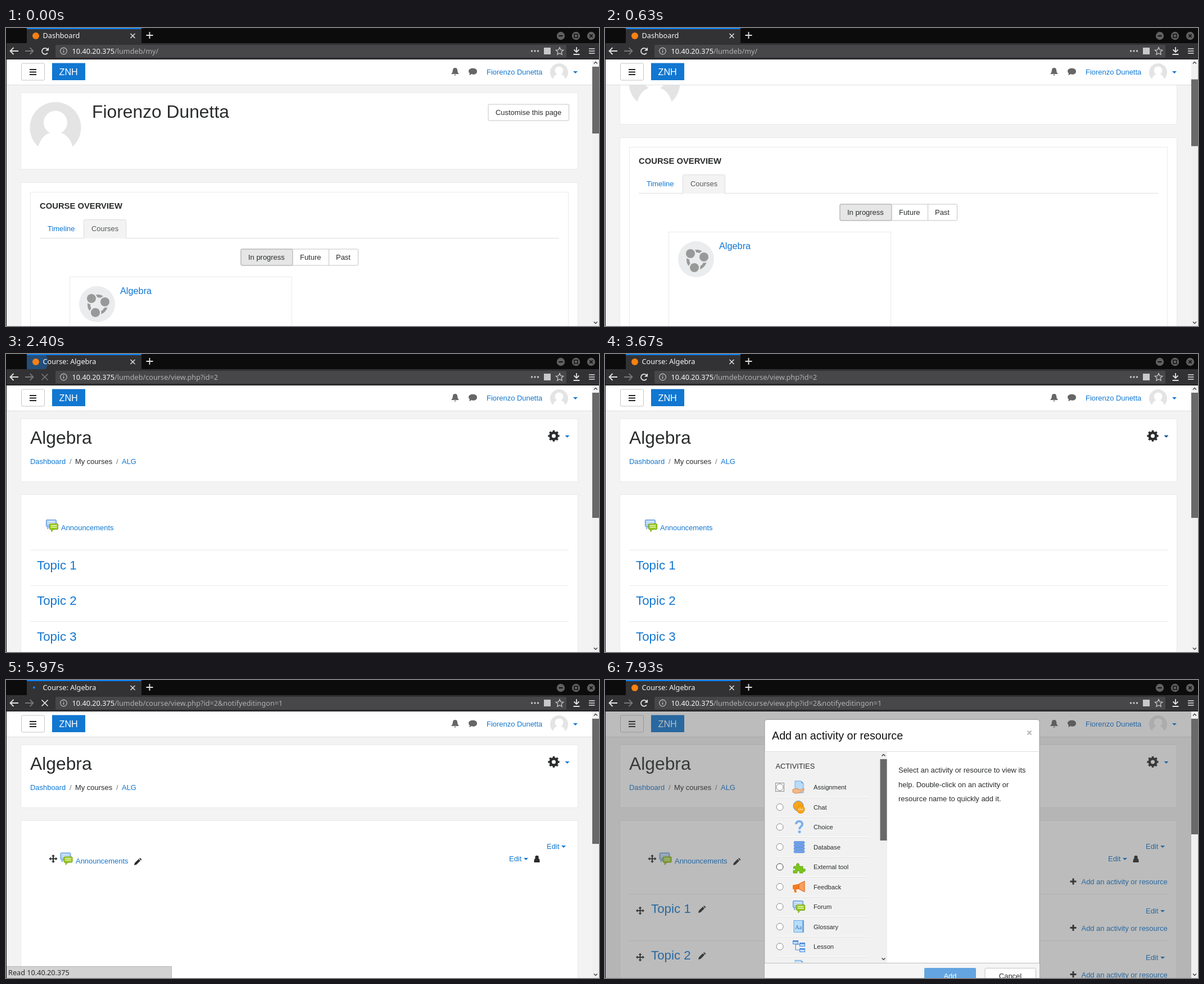
An HTML page that plays this animation: 1055 px wide and 531 px high, repeating every 8000 ms.

```html
<!DOCTYPE html>
<html lang="en">
<head>
<meta charset="utf-8">
<title>Course editing</title>
<style>
html, body { margin: 0; width: 100%; height: 100%; overflow: hidden; background: #f3f3f3; }
svg { display: block; font-family: "Liberation Sans", Arial, sans-serif; }
.ui { font-family: "Noto Sans", sans-serif; font-size: 12.7px; }
</style>
</head>
<body>
<svg id="stage" width="1055" height="531" viewBox="0 0 1055 531"></svg>
<script>
const INK = '#292b2c', LINK = '#1177d1', DARK = '#0b4f8a', LINE = '#eaeaea';
const HOST = '10.40.20.375', ROOT = '/lumdeb/', USER = 'Fiorenzo Dunetta';

// Markup helpers
const text = (x, y, s, fill = INK, size = 12.95, more = '') =>
  `<text x="${x}" y="${y}" fill="${fill}" font-size="${size}" ${more}>${s}</text>`;
const ui = (x, y, s, fill, more = '') => `<text class="ui" x="${x}" y="${y}" fill="${fill}" ${more}>${s}</text>`;
const box = (x, y, w, h, fill, more = '') =>
  `<rect x="${x}" y="${y}" width="${w}" height="${h}" fill="${fill}" ${more}/>`;
const frame = (x, y, w, h, stroke = LINE, fill = '#fff', r = 0) =>
  box(x + .5, y + .5, w - 1, h - 1, fill, `stroke="${stroke}" rx="${r}"`);
const dot = (x, y, r, fill, more = '') => `<circle cx="${x}" cy="${y}" r="${r}" fill="${fill}" ${more}/>`;
const fill = (d, c, more = '') => `<path d="${d}" fill="${c}" ${more}/>`;
const line = (d, c, w = 1, more = '') => `<path d="${d}" fill="none" stroke="${c}" stroke-width="${w}" ${more}/>`;
const rule = (x1, x2, y, c = LINE) => line(`M${x1} ${y + .5}H${x2}`, c);
const at = (x, y, s, more = '') => `<g transform="translate(${x} ${y}) ${more}">${s}</g>`;
const group = (id, s, more = '') => `<g id="${id}" ${more}>${s}</g>`;
const repeat = (n, f) => Array.from({ length: n }, (_, i) => f(i)).join('');

// Icons, centred on x, y
const caret = (x, y, c = LINK, more = '') => fill(`M${x - 4} ${y - 2}h8l-4 4z`, c, more);
const gear = (x, y, r) =>
  dot(x, y, r * .58, 'none', `stroke="${INK}" stroke-width="${r * .46}"`) +
  dot(x, y, r * .86, 'none', `stroke="${INK}" stroke-width="${r * .3}" pathLength="16" stroke-dasharray="1" stroke-dashoffset=".5"`);
const pencil = (x, y) => at(x, y, fill('M-6 6l1-4L2-5l3 3-7 7zM3-6l1.5-1 3 3L6-2.500z', INK));
const move = (x, y) => at(x, y, line('M-5 0H5M0-5V5', INK, 2) +
  repeat(4, i => fill('M-3-4.300L0-7.500 3-4.300z', INK, `transform="rotate(${i * 90})"`)));
const plus = (x, y) => line(`M${x - 5.5} ${y}h11M${x} ${y - 5.5}v11`, INK, 3);
const person = (x, y) => dot(x, y - 3, 3.2, INK) + fill(`M${x - 5} ${y + 6}v-3q0-4 3-4h4q3 0 3 4v3z`, INK);
const avatar = (x, y, k) => at(x, y, dot(0, 0, 45.5, '#e4e4e4') + dot(0, -9, 21, '#fff') +
  fill('M-32 40C-28 18-16 8 0 8S28 18 32 40V46H-32z', '#fff'), `scale(${k})`);
const bubble = (x, y, w, h, c, edge, tail) => frame(x, y, w, h, edge, c, 1.5) +
  fill(`M${x + tail} ${y + h - 1}h5l-4 5z`, c, `stroke="${edge}" stroke-width=".7"`) +
  rule(x + 3, x + w - 3, y + 3, '#fff') + rule(x + 3, x + w - 3, y + 6, '#fff');
const forum = (x, y) => at(x, y, bubble(-11, -11, 19, 13, '#a9cdf5', '#5b93d6', 2) +
  bubble(-5, -4, 16, 11, '#a4d12a', '#6a9a10', 3));
const page = fill('M-7-11H4l4 4V10H-7z', '#b9dcfa', 'stroke="#6aa6de"') + fill('M4-11v4h4z', '#6aa6de');
const chevron = (x, y, up) => line(`M${x - 3} ${y + up * 1.5}l3 ${-up * 3}l3 ${up * 3}`, '#444', 1.5);
const scrollBar = (x, y, h, id, thumbY, thumbH) => box(x, y, 12, h, '#f0f0f0') +
  chevron(x + 6, y + 6, 1) + chevron(x + 6, y + h - 6, -1) + box(x, thumbY, 12, thumbH, '#696969', `id="${id}"`);

// Pages
const dashboard = () => frame(26, 115, 992, 137) + avatar(88, 177.5, 1) + text(153, 160, USER, INK, 31.8) +
  frame(857.5, 135.5, 144.5, 30, '#c4c4c4', '#fff', 2) + text(871, 155, 'Customise this page') +
  frame(26, 275, 992, 600) + frame(43, 292, 958, 600) +
  text(60, 322, 'COURSE OVERVIEW', INK, 14.8, 'font-weight="bold"') +
  text(74, 362, 'Timeline', LINK) + rule(60, 984, 374, '#ddd') +
  line('M138.500 374V343.500q0-2 2-2H211.500q2 0 2 2V374', '#ddd', 1, 'style="fill:#f3f3f3"') +
  box(139, 374, 74, 1, '#f3f3f3') + text(152, 362, 'Courses', '#55595c') +
  frame(417.5, 393.5, 209.5, 30, '#c4c4c4', '#fff', 2) + frame(417.5, 393.5, 93, 30, '#a8a8a8', '#e6e6e6', 2) +
  line('M574.500 394v29', '#c4c4c4') +
  text(431, 413, 'In progress') + text(523, 413, 'Future') + text(587, 413, 'Past') +
  frame(113, 443, 396, 500) + dot(162, 492, 32, '#ebeced') +
  dot(163, 493, 15.5, 'none', 'stroke="#999" stroke-width="5"') +
  [[152, 482, 8], [176, 488, 8], [159, 507, 8]].map(([x, y, r]) =>
    dot(x, y, r + 2.5, '#ebeced') + dot(x, y, r, '#999')).join('') +
  text(203, 474, 'Algebra', LINK, 16.3, 'id="courseLink"') +
  group('courseLine', rule(203, 259, 476, DARK));

const courseHead = () => frame(26, 115, 992, 113) + text(43, 160, 'Algebra', INK, 31.8) +
  text(43, 196, 'Dashboard', LINK) + text(113, 196, '/', '#777') + text(123, 196, 'My courses') +
  text(196, 196, '/', '#777') + text(206, 196, 'ALG', LINK) +
  gear(974.5, 146, 10) + caret(998.5, 147, LINK, 'id="gearCaret"') + frame(26, 250, 992, 400);

const topics = () => forum(82, 306) + text(98, 314, 'Announcements', LINK) +
  repeat(3, i => rule(43, 1001, 349 + 63.7 * i | 0) + text(55, 383.5 + 63.7 * i, 'Topic ' + (i + 1), LINK, 22.3));

const menuIcons = [
  (x, y) => gear(x, y, 6.5), pencil, (x, y) => gear(x, y, 6.5),
  (x, y) => fill(`M${x - 6} ${y - 5}h12l-4.500 5v6l-3-2.500v-3.500z`, INK),
  (x, y) => gear(x, y, 6.5),
  (x, y) => at(x, y, line('M-5.500-6.500H2l3.500 3.500V6.500H-5.500zM2-6v3.500h3.500', INK, 1.3) + line('M-1.500-5V1', INK, 2, 'stroke-dasharray="1.2"') + dot(-1, 3, 1.8, INK)),
  ...Array(2).fill((x, y) => at(x, y, line('M-4 5H1V-3', INK, 2) + fill('M-3-2L1-6.500 5-2z', INK))),
  (x, y) => at(x, y, line('M6 0H-4M0-5L-5 0 0 5', INK, 2.5)),
  (x, y) => gear(x, y, 6.5)
];
const menu = () => frame(838.5, 163, 167.5, 355, '#d2d2d2') +
  group('menuRow', box(839.5, 203, 165.5, 34, '#f3f3f3')) +
  ['Edit settings', 'Turn editing on', 'Course completion', 'Filters', 'Gradebook setup', 'Backup', 'Restore', 'Import', 'Reset', 'More...']
    .map((s, i) => menuIcons[i](865, 185.5 + 34.55 * i) + text(878.5, 189 + 34.55 * i, s) +
      (i ? rule(839, 1005, Math.round(167.5 + 34.55 * i), '#ddd') : '')).join('') +
  group('settingsLine', rule(879, 949, 190, INK)) + group('editingLine', rule(879, 965, 225, INK));

const editLink = (x, y) => text(x, y, 'Edit', LINK) + caret(x + 30, y - 4);
const addLink = y => plus(833, y - 5) + text(847.5, y, 'Add an activity or resource', LINK);
const editing = () => move(84, 318.5) + forum(107.5, 318.5) + text(124, 327, 'Announcements', LINK) +
  pencil(234, 324) + editLink(962, 301) + editLink(895, 323) + person(944.5, 319) +
  group('sections', addLink(364) + repeat(2, i => at(0, 83 * i, rule(43, 1001, 381) + move(62.5, 411) +
    text(82, 415, 'Topic ' + (i + 1), LINK, 22.3) + pencil(172, 409) + editLink(962, 416) + addLink(446.5))) +
    group('addLine', rule(848, 1001, 365, DARK)));

const nav = () => box(1, 56, 1042, 45, '#fff') + rule(1, 1043, 101, '#dedede') +
  frame(27, 62.5, 42, 31, '#c4c4c4', '#fff', 2) + line('M42 74h12M42 78.500h12M42 83h12', '#222', 2) +
  box(82, 62.5, 59, 30.5, LINK) + text(94.5, 84, 'ZNH', '#fff', 16.2) +
  fill('M792 82q3-3 3-7 0-4 4-4 4 0 4 4 0 4 3 7zM797 83h4q-2 3-4 0z', '#666') +
  fill('M823 77c0-7 15-7 15 0s-8 6-10 5q-2 2-4 2 1-2 1-3-2-2-2-4z', '#666') +
  text(855, 83, USER, LINK) + avatar(984, 79, .352) + caret(1013, 79);

const activities = [
  ['Assignment', page + fill('M-11 4l8-2 5 3 6-3 2 2-8 6-8 1-5-2z', '#f3b98a', 'stroke="#d98c50"')],
  ['Chat', dot(-1, -2, 9, '#f9a61a', 'stroke="#5b93e0"') + dot(3, 4, 7, '#f9a61a', 'stroke="#e58a00"') +
    [0, 3, 6].map(x => dot(x, 4, 1, '#fff')).join('')],
  ['Choice', line('M-5-5c0-7 11-7 11 0 0 4-5 4-5 9', '#7db1ec', 4) + dot(1, 8.5, 2.5, '#7db1ec')],
  ['Database', repeat(4, i => box(-9, -10 + 5.3 * i, 19, 4.6, '#6ea0e8', 'rx="2" stroke="#4a7fd0" stroke-width=".6"'))],
  ['External tool', fill('M-9 0h5c-3-7 7-7 4 0h7v5c6-3 6 6 0 4v3H1c2-5-6-5-4 0h-7V7c5 2 5-5 0-3z', '#7cc41e',
    'stroke="#5a9a0c" stroke-width=".8" transform="translate(0 -1)"')],
  ['Feedback', fill('M-11-3L0-5v9l-5 1 1 5h-4l-1-6h-2z', '#f47a20') + fill('M0-5L10-10V9L0 4z', '#f9a05a', 'stroke="#d85c08"')],
  ['Forum', forum(0, 0)],
  ['Glossary', box(-9, -11, 17, 21, '#b9dcfa', 'stroke="#6aa6de"') + box(6, -11, 3, 21, '#6aa6de') +
    '<text x="-7" y="4" font-size="10.500" font-family="Liberation Serif, serif" fill="#3470b8">Aa</text>'],
  ['Lesson', line('M-6-6V6H2M-6-4H2', '#4a86d8') + [[-11, -11], [1, -7], [1, 3]].map(([x, y]) =>
    frame(x, y, 10, 7, '#4a86d8', '#c4dffa') + box(x, y, 10, 2.5, '#4a86d8')).join('')],
  ['Page', page]
];
const modal = () => frame(283.5, 70, 490, 500, '#999', '#fff', 4) + rule(284, 773, 127, '#ddd') +
  text(297, 106, 'Add an activity or resource', '#111', 19.7) +
  line('M751.500 90.500l7 7m0-7l-7 7', '#b5b5b5', 2) + box(284.5, 128, 217.5, 375.5, '#f1f1f1') +
  text(303.5, 157.5, 'ACTIVITIES', INK, 12.8) +
  `<g clip-path="url(#list)">${activities.map(([name, icon], i) => at(0, 35.5 * i,
    dot(311, 191, 6, '#fff', `stroke="${i == 4 ? '#444' : '#8a8a8a'}"`) + at(345, 191, icon) +
    text(371, 195, name, INK, 11.2) + rule(304, 469, 208, '#fff') + rule(304, 469, 209, '#e4e4e4'))).join('')}</g>` +
  box(303.5, 183.5, 15, 15, 'none', 'id="focus" stroke="#333" stroke-dasharray="1"') +
  scrollBar(489.5, 128, 375, 'listThumb', 141, 145) +
  ['Select an activity or resource to view its', 'help. Double-click on an activity or', 'resource name to quickly add it.']
    .map((s, i) => text(522, 165 + 25.5 * i, s)).join('') +
  box(284, 504, 489, 27, '#f5f5f5') + rule(284, 773, 504, '#bbb') +
  box(568, 513, 92, 30, '#64a5e1', 'rx="2"') + text(614, 532, 'Add', '#fff', 12.95, 'text-anchor="middle"') +
  frame(675.5, 513, 91.5, 30, '#c4c4c4', '#fff', 2) + text(721, 532, 'Cancel', INK, 12.95, 'text-anchor="middle"');

const chrome = () => {
  const light = '#e4e4e5', dim = '#77777a';
  const cross = (x, y, r, c, w) => line(`M${x - r} ${y - r}l${2 * r} ${2 * r}m0 ${-2 * r}l${-2 * r} ${2 * r}`, c, w);
  const arrow = 'M7.500 0H-6.500M-1-6L-7 0l6 6';
  return box(0, 0, 1055, 27, '#0c0c0c') + box(0, 27, 1055, 29, '#323234') + box(37, 0, 204, 27, '#323234') +
    box(37, 0, 204, 2, '#0a84ff') + box(0, 55, 1055, 1, '#0c0c0d') + box(0, 0, 1, 531, '#0c0c0c') +
    '<g clip-path="url(#tab)">' + dot(53, 14, 10, '#0a84ff', 'id="burst"') + '</g>' +
    dot(53, 14, 6, '#f98012', 'id="favicon"') + dot(53, 13.5, 2, '#0a84ff', 'id="throbber"') +
    ui(65.5, 18, '', '#f9f9fa', 'id="title"') + cross(225.5, 14, 4, light, 1.5) +
    line('M249.500 13h12m-6-6v12', light, 1.8) +
    [987, 1014, 1041].map(x => dot(x, 14, 7.2, '#606060')).join('') +
    line('M983.500 14h7', '#111', 2) + box(1011, 11, 6, 6, 'none', 'stroke="#111" stroke-width="1.5"') + cross(1041, 14, 2.7, '#111', 1.7) +
    at(14.5, 41, line(arrow, light, 1.8)) + at(41.5, 41, line(arrow, dim, 1.8), 'scale(-1 1)') +
    group('reload', line('M74 44.500a5.500 5.500 0 1 1-.5-7', light, 1.8) + fill('M76 34.500v6h-6z', light)) +
    group('stop', cross(69, 41, 5.5, 'currentColor', 1.7)) +
    box(88, 30, 909, 22.5, '#474749', 'rx="2"') + dot(102.5, 41, 5.8, 'none', 'stroke="#c0c0c2" stroke-width="1.2"') +
    line('M102.500 40v4M102.500 37.500v1.300', '#c0c0c2', 1.5) +
    ui(117.5, 46, `${HOST}<tspan id="path" fill="#b1b1b3"></tspan>`, '#f9f9fa') +
    [935.5, 941, 946.5].map(x => dot(x, 41, 1.7, '#c8c8c9')).join('') + box(957, 35, 12, 12, '#c8c8c9') +
    line('M985 34.500l2 4.300 4.700.6-3.500 3.200.9 4.600-4.100-2.300-4.100 2.300.9-4.600-3.500-3.200 4.700-.6z', '#c8c8c9', 1.3) +
    line('M1015 34v9m-4.500-4.500l4.500 4.500 4.500-4.500M1009.500 47h11', light, 1.8) +
    line('M1037 37h10.500M1037 41h10.500M1037 45h10.500', light, 1.7);
};

document.getElementById('stage').innerHTML =
  '<clipPath id="tab"><rect x="37" y="2" width="204" height="25"/></clipPath>' +
  '<clipPath id="list"><rect x="285" y="128" width="205" height="375"/></clipPath>' +
  box(0, 0, 1055, 531, '#f3f3f3') + group('dashboard', dashboard()) +
  group('course', courseHead() + group('topics', topics()) + group('editing', editing()) + group('menu', menu())) +
  nav() + box(1, 56, 1042, 475, '#505050', 'id="mask" opacity=".38"') + group('modal', modal()) +
  scrollBar(1043, 56, 475, 'thumb', 69, 119) +
  group('status', box(0.5, 510.5, 269, 22, '#d2d2d2', 'id="statusBox" stroke="#b4b4b4"') + ui(4, 526, '', '#2a2a2a', 'id="statusText"')) +
  chrome();

const $ = id => document.getElementById(id);
const set = (id, name, value) => $(id).setAttribute(name, value);
const show = (id, on) => { $(id).style.display = on ? '' : 'none'; };
const label = (id, s) => { if ($(id).textContent !== s) $(id).textContent = s; };
const ramp = (t, from, to) => Math.min(1, Math.max(0, (t - from) / (to - from)));
const smooth = u => u * u * (3 - 2 * u);
const within = (t, a, b) => t >= a && t < b;

const VIEW = ROOT + 'course/view.php?id=2';
// [start, end, text, fade-in time, minimum width]
const messages = [
  [1270, 1730, HOST + VIEW, 170, 0],
  [1730, 2100, 'Waiting for ' + HOST + '…', 0, 294],
  [2100, 2330, 'Read ' + HOST, 0, 294],
  [3870, 4330, HOST + VIEW + '#', 130, 0],
  [4330, 4670, HOST + ROOT + 'course/edit.php?id=2', 0, 0],
  [4670, 4870, HOST + VIEW + '&sesskey=Qv7KdPz3Lm&edit=on', 0, 0],
  [4870, 5870, 'Waiting for ' + HOST + '…', 0, 294],
  [5870, 6100, 'Read ' + HOST, 0, 294],
  [7000, 7630, HOST + VIEW + '#', 170, 0]
];

function render(t) {
  const scroll = 52 * (smooth(ramp(t, 100, 430)) + smooth(ramp(t, 440, 800)));
  const onCourse = t >= 2100, edit = t >= 5870, full = t >= 6030;
  set('dashboard', 'transform', `translate(0 ${-Math.round(scroll)})`);
  show('dashboard', !onCourse);
  show('course', onCourse);
  show('topics', !edit);
  show('editing', edit);
  show('sections', full);
  set('courseLink', 'fill', t >= 1270 ? DARK : LINK);
  show('courseLine', t >= 1270);
  set('gearCaret', 'fill', within(t, 3670, 4670) ? DARK : LINK);
  show('menu', within(t, 3870, 4870));
  show('menuRow', t >= 4000);
  show('settingsLine', within(t, 4330, 4400));
  show('editingLine', t >= 4730);
  show('addLine', within(t, 7000, 7630));
  show('mask', t >= 7630);
  show('modal', t >= 7700);
  show('focus', t >= 7900);
  set('thumb', 'y', onCourse ? 69 : 69 + scroll * .28);
  set('thumb', 'height', full ? 206 : onCourse ? 223 : 119);

  const loading = within(t, 1730, 2330) || within(t, 4870, 6100);
  const cooling = within(t, 2330, 3000) || within(t, 6100, 6730);
  show('reload', !loading && !cooling);
  show('stop', loading || cooling);
  set('stop', 'color', loading ? '#e4e4e5' : '#77777a');
  show('throbber', loading);
  show('favicon', !loading);
  set('throbber', 'cx', 53 + 6 * Math.cos((t - 5970) / 1050 * 2 * Math.PI + 2.1));
  const burst = ramp(t, 2330, 2800) % 1 || ramp(t, 6100, 6630) % 1;
  set('burst', 'r', 8 + 90 * burst);
  set('burst', 'opacity', burst ? .4 * (1 - burst) : 0);
  label('title', onCourse ? 'Course: Algebra' : 'Dashboard');
  label('path', t < 1930 ? ROOT + 'my/' : edit ? VIEW + '&notifyeditingon=1' : VIEW);

  const message = messages.find(m => within(t, m[0], m[1]));
  show('status', message);
  if (message) {
    const [start, , words, fade, least] = message;
    label('statusText', words);
    set('statusBox', 'width', Math.max(least, $('statusText').getComputedTextLength() + 8));
    set('status', 'opacity', fade ? .25 + .75 * ramp(t, start, start + fade) : 1);
  }
}

const begin = performance.now();
(function tick() {
  render((performance.now() - begin) % 8000);
  requestAnimationFrame(tick);
})();
</script>
</body>
</html>
```
